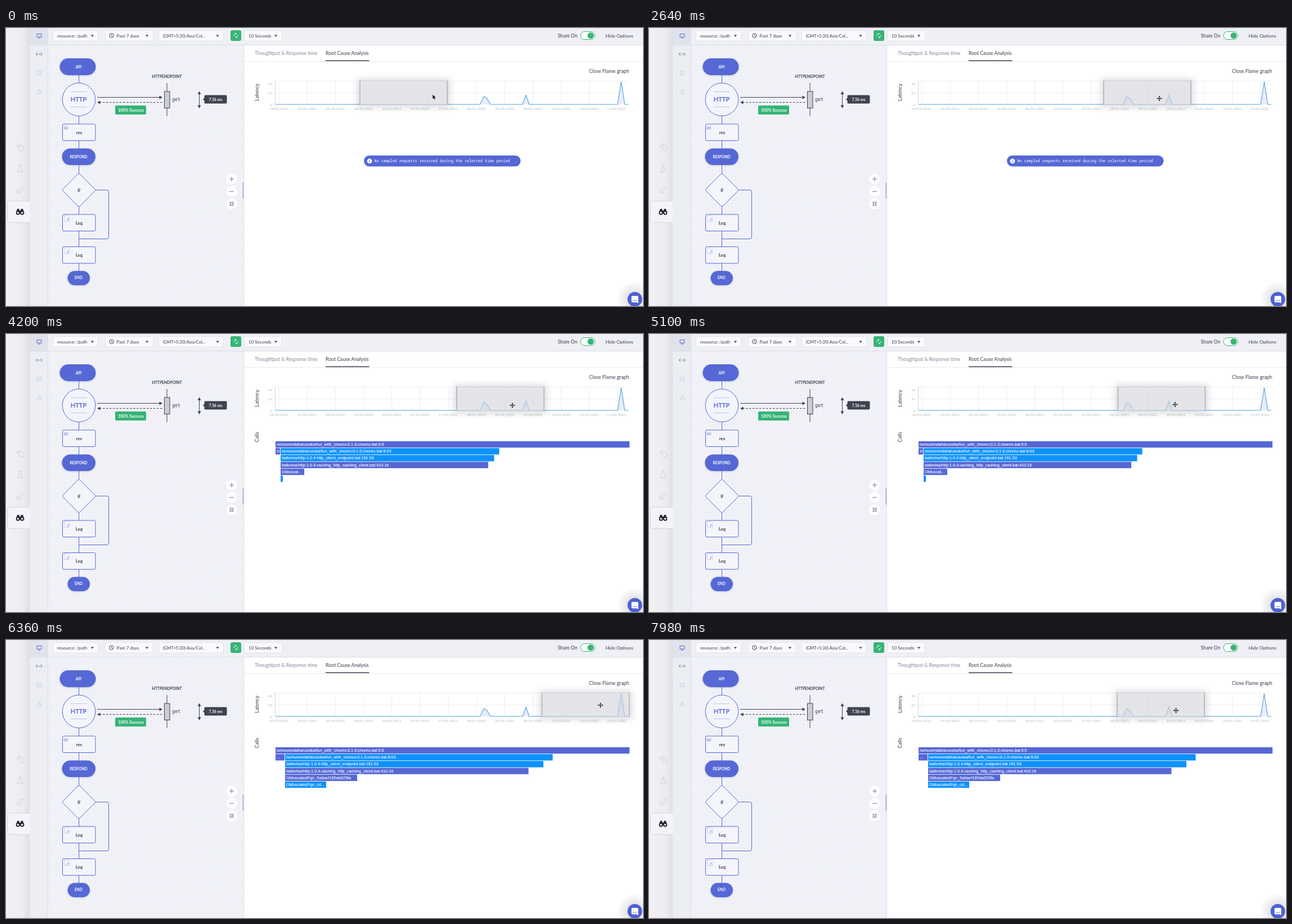
Recreate the animation shown at these times as an HTML page. Size 1132 by 495 pixels, loop 8000 ms.

```html
<!DOCTYPE html>
<html lang="en">
<head>
<meta charset="utf-8">
<title>Root cause analysis</title>
<style>
  html, body { margin: 0; width: 100%; height: 100%; overflow: hidden; background: #fff; }
  svg { display: block; width: 1132px; height: 495px; font-family: Lato, sans-serif; font-size: 8px; fill: none; }
  text { fill: #3b3c4c; white-space: pre; }
  .mid { text-anchor: middle; }
  .bold { font-weight: 700; }
  .white text, text.white { fill: #fff; }
  .mono { font-family: "Noto Sans Mono", "DejaVu Sans Mono", monospace; }
  .blue { fill: #5567d5; }
  .line { stroke: #5567d5; }
  .dark { stroke: #40414d; }
  .node { fill: #f4f5fb; stroke: #5567d5; }
  .box { fill: #fafafd; stroke: #e1e3ec; }
  .faint { stroke: #cdcfd8; }
  .axis text { fill: #b1b4c0; font-size: 6.1px; }
  .flame text { fill: #fff; font: 7.32px "Liberation Sans", Arial, sans-serif; stroke: #fff; stroke-width: .12; }
</style>
</head>
<body>
<svg viewBox="0 0 1132 495">
  <defs>
    <pattern id="dots" x="75" y="31" width="5.8" height="5.8" patternUnits="userSpaceOnUse">
      <circle cx="2.9" cy="2.9" r=".55" fill="#d3d6e1"/>
    </pattern>
    <pattern id="hatch" width="2.6" height="2.6" patternUnits="userSpaceOnUse" patternTransform="rotate(45)">
      <path d="M.6 0V2.6" stroke="#777883" stroke-width=".8"/>
    </pattern>
    <linearGradient id="rail">
      <stop offset="0" stop-color="#f1f1f4"/><stop offset=".7" stop-color="#ededf1"/><stop offset="1" stop-color="#dfe0e6"/>
    </linearGradient>
    <radialGradient id="glow">
      <stop offset=".4" stop-color="#334" stop-opacity=".13"/><stop offset="1" stop-color="#334" stop-opacity="0"/>
    </radialGradient>
    <filter id="blur" x="-20%" y="-60%" width="140%" height="220%"><feGaussianBlur stdDeviation="6"/></filter>
    <filter id="soft" x="-30%" y="-30%" width="160%" height="170%">
      <feDropShadow dx="0" dy="1" stdDeviation="1.5" flood-color="#335" flood-opacity=".22"/>
    </filter>
    <path id="caret" d="M-2.7-1.5H2.7L0 1.8Z" fill="#40414d"/>
    <g id="log">
      <rect class="node" x="100.5" width="58.5" height="29.5" rx="2.5"/>
      <path d="M104 2.5H110.500L112.500 4.500V12H104Z" fill="#fff" stroke="#b4bce8" stroke-width=".8"/>
      <path class="line" d="M108.500 6L111 8.500 108.500 11"/>
      <text class="mid bold" x="130" y="17.500">Log</text>
    </g>
  </defs>

  <!-- side rails and panels -->
  <rect width="42" height="495" fill="url(#rail)"/>
  <rect x="42" width="33" height="495" fill="#eceef4"/>
  <rect x="42" width="33" height="30" fill="#e0e3ec"/>
  <rect x="75" width="1057" height="30" fill="#eff0f5"/>
  <rect x="75" y="30" width="348" height="465" fill="#f1f2f8"/>
  <rect x="75" y="31" width="347" height="464" fill="url(#dots)"/>
  <path d="M41.500 0V495M74.500 30V495M42 30.500H1132M422.500 30V495" stroke="#dcdee7"/>
  <path d="M423 59.500H1132" stroke="#e9eaef"/>
  <path d="M42 308H8Q2.500 308 2.500 313.500V341Q2.500 346.500 8 346.500H42" fill="#f3f4f9" stroke="#d3d5de"/>
  <g class="faint">
    <path d="M19 211L24 206.500 29 211A4 4 0 1 1 24 215ZM20 211H27"/>
    <path d="M22.500 244H27.500M23.500 244V249L20 256H30L26.500 249V244"/>
    <path d="M21 291Q23 284 30 283.500 30 290 23 293ZM20 288L18 291M25 292L23 296M19 295L21 292"/>
    <path d="M55.500 76.500H62.500V81H55.500ZM54.500 83.500H63.500M59 109L63.500 117H54.500ZM59 112V114.500"/>
  </g>
  <g fill="#24252f">
    <path d="M20 322H23.500V325H26.500V322H30L32 329H18Z"/>
    <circle cx="21.300" cy="329" r="3.700"/><circle cx="28.700" cy="329" r="3.700"/>
    <circle cx="21.300" cy="329" r="1.800" fill="#f3f4f9"/><circle cx="28.700" cy="329" r="1.800" fill="#f3f4f9"/>
  </g>
  <path class="line" d="M55 10.500H63V16H55ZM57 18H61"/>
  <path class="dark" d="M56 44L53.500 46.500 56 49M61.500 44L64 46.500 61.500 49M58 46.500H59.800"/>

  <!-- header -->
  <g class="box">
    <rect x="83.500" y="4.500" width="80" height="18.500" rx="3"/>
    <rect x="176.500" y="4.500" width="85" height="18.500" rx="3"/>
    <rect x="271.500" y="4.500" width="115" height="18.500" rx="3"/>
    <rect x="423.500" y="4.500" width="67" height="18.500" rx="3"/>
  </g>
  <text x="91" y="16.500">resource: /path</text>
  <text x="196.500" y="16.500" font-size="8.100">Past 7 days</text>
  <text x="279" y="16.500" font-size="7.500">(GMT+5:30) Asia/Col...</text>
  <text x="431" y="16.500">10 Seconds</text>
  <use href="#caret" x="153.500" y="14"/><use href="#caret" x="250.500" y="14"/>
  <use href="#caret" x="376" y="14"/><use href="#caret" x="479.500" y="14"/>
  <circle class="dark" cx="187.500" cy="13.500" r="3.800"/><path class="dark" d="M187.500 11V14L189.500 15" stroke-width=".8"/>
  <rect x="399" y="4" width="19" height="19" rx="3" fill="#36b475"/>
  <path d="M405 14.500V12.500L408.500 10M406.500 9.500L409 10 408.500 12M412 12.500V14.500L408.500 17M411 17.500L408.500 17 409 15" stroke="#fff" stroke-width=".9"/>
  <text x="980.500" y="16.800" font-size="8.600">Share On</text>
  <rect x="1021" y="6.500" width="25.500" height="14" rx="7" fill="#fff" stroke="#36b475"/>
  <circle cx="1039" cy="13.500" r="5.500" fill="#36b475"/>
  <text x="1065.500" y="16.800" font-size="8.400">Hide Options</text>

  <!-- flow diagram -->
  <path class="line" d="M129.500 84V98M129.500 156V171M129.500 200V215M129.500 244V259M129.500 318V332M129.500 361V390M129.500 419V433M159 288.500H179Q182.500 288.500 182.500 292V372Q182.500 375.500 179 375.500H129.500"/>
  <g class="blue" filter="url(#soft)">
    <rect x="95.500" y="54" width="64" height="30" rx="15"/>
    <rect x="99.500" y="214.500" width="59.500" height="29.500" rx="14.700"/>
    <rect x="109.500" y="432.500" width="39.500" height="25.500" rx="12.700"/>
  </g>
  <g class="mid bold white" font-size="6.600">
    <text x="129" y="71.600">API</text><text x="129" y="231.800">RESPOND</text><text x="129" y="447.400">END</text>
  </g>
  <circle class="node" cx="129.500" cy="127.300" r="29.300"/>
  <path d="M115 113.500H143.500M115 140.500H143.500" stroke="#bac2ec"/>
  <text class="mid bold blue" x="129" y="131" font-size="11" style="fill:#5567d5">HTTP</text>
  <rect class="node" x="100.500" y="171" width="58.500" height="29.500" rx="2.500"/>
  <text x="102.500" y="179.500" font-style="italic" style="fill:#5567d5">(x)</text>
  <text class="mid bold" x="130" y="189">res</text>
  <path class="node" d="M127.500 260.200Q129.500 258.200 131.500 260.200L157.500 286.500Q159.500 288.500 157.500 290.500L131.500 316.800Q129.500 318.800 127.500 316.800L101.500 290.500Q99.500 288.500 101.500 286.500Z"/>
  <text class="mid bold" x="130" y="292" font-size="6.500">IF</text>
  <use href="#log" y="332"/><use href="#log" y="389.500"/>

  <text class="mid bold" x="286" y="89" font-size="6.800">HTTPENDPOINT</text>
  <path class="dark" d="M286 98V157M162 123.500H274M343.500 116V140"/>
  <path class="dark" d="M166 132.500H280" stroke-dasharray="3.500 2.500"/>
  <path d="M278 123.500L272.500 120.500V126.500ZM162 132.500L167.500 129.500V135.500ZM343.500 112.500L340.500 118H346.500ZM343.500 143L340.500 137.500H346.500Z" fill="#40414d"/>
  <rect x="281.500" y="113" width="9.500" height="29.500" fill="#f1f2f8"/>
  <rect class="dark" x="281.500" y="113" width="9.500" height="29.500" style="fill:url(#hatch)"/>
  <text class="mono" x="295" y="130" font-size="8.300">get</text>
  <rect x="194" y="138" width="55" height="16" rx="2" fill="#36b475"/>
  <text class="mid bold white" x="222" y="148.700" font-size="7.300">100% Success</text>
  <path d="M354 119.500H390.500Q392.500 119.500 392.500 121.500V132.500Q392.500 134.500 390.500 134.500H354Q352.500 134.500 352.500 132.500V129.500L350 127 352.500 124.500V121.500Q352.500 119.500 354 119.500Z" fill="#40424f"/>
  <text class="mid bold white" x="372.500" y="129.500" font-size="6.800">7.56 ms</text>

  <g fill="#fff"><circle cx="401" cy="269" r="9.700"/><circle cx="401" cy="291" r="9.700"/><circle cx="401" cy="313" r="9.700"/></g>
  <path d="M397 269H405M401 265V273M397 291H405" stroke="#777983"/>
  <path d="M397 309L400 312M400 309.500V312H397.500M405 309L402 312M402 309.500V312H404.500M397 317L400 314M400 316.500V314H397.500M405 317L402 314M402 316.500V314H404.500" stroke="#777983"/>
  <rect x="420" y="275" width="3" height="29" rx="1" fill="#c3c6d0"/>

  <!-- analysis panel -->
  <text x="442" y="48" font-size="8.700" style="fill:#85879a">Thoughtput &amp; Response time</text>
  <text x="568" y="48" font-size="8.700">Root Cause Analysis</text>
  <path d="M568 58.300H645.500" stroke="#40414d" stroke-width="1.500"/>
  <text x="1036" y="80" font-size="8.850">Close Flame graph</text>
  <text class="mid" transform="translate(449 114.500) rotate(-90)" font-size="9">Latency</text>
  <g id="axis" class="axis">
    <path d="M478 94.500H1106M478 115.500H1106" stroke="#eeeff3"/>
    <path d="M478.500 94V136" stroke="#d3d5de"/>
    <g text-anchor="end"><text x="473" y="101.500">40</text><text x="473" y="117.500">20</text><text x="473" y="138.500">0</text></g>
  </g>
  <path d="M478.500 136H842.500L849 122 855 126 861 136H918L924 119.500 930 136H1087L1093.300 95.500 1099.500 136H1106" stroke="#49a3e2" stroke-width="1.100" fill="#5567d5" fill-opacity=".12"/>
  <g id="brush">
    <rect x="-5" y="90" width="165" height="52" fill="#445" opacity=".17" filter="url(#blur)"/>
    <rect y="94" width="155" height="42.500" fill="#e9eaef" fill-opacity=".55"/>
    <path d="M0 94H155M0 136.500H155" stroke="#c6c8d2" stroke-width=".8"/>
    <path d="M0 93.500V137M155 93.500V137" stroke="#b9bbc5" stroke-width="2"/>
  </g>

  <g id="empty">
    <rect class="blue" x="636" y="227" width="278.500" height="19.500" rx="9.700"/>
    <circle cx="646" cy="237" r="4.400" fill="#fff"/>
    <path class="line" d="M646 236V239.500M646 234V235.200" stroke-width="1.200"/>
    <text class="mono white" x="654.500" y="239.300" font-size="6.700">No sampled requests received during the selected time period</text>
  </g>
  <g id="loading">
    <circle cx="751" cy="229" r="7.800" stroke="#e7e8ef" stroke-width="2.400"/>
    <path id="spinner" class="line" d="M0 7.800A7.800 7.800 0 0 1-7.400-2.400" stroke-width="2.400"/>
    <text id="loadingText" x="766" y="231.500" font-size="8.400" style="fill:#9496a5"></text>
  </g>
  <text id="calls" class="mid" transform="translate(449 183.500) rotate(-90)" font-size="9">Calls</text>
  <g id="flameA" class="flame"></g>
  <g id="flameB" class="flame"></g>

  <circle cx="1117" cy="483" r="32" fill="url(#glow)"/>
  <circle cx="1117.500" cy="483" r="13" fill="#4f61d2"/>
  <path d="M1113.500 477H1121.500Q1123.500 477 1123.500 479V490L1120.500 488.500H1113.500Q1111.500 488.500 1111.500 486.500V479Q1111.500 477 1113.500 477Z" fill="#fff"/>
  <path d="M1114 484.500Q1117.500 487 1121 484.500" stroke="#4f61d2" stroke-width=".9"/>

  <path id="arrow" d="M0 0V9L2.200 7.200 3.700 10.200 5.200 9.500 3.800 6.600 6.500 6.300Z" fill="#111" stroke="#fff" stroke-width=".6"/>
  <path id="move" d="M0-5L2.200-2.500H.8V-.8H2.500V-2.200L5 0 2.500 2.200V.8H.8V2.500H2.200L0 5-2.200 2.500H-.8V.8H-2.500V2.200L-5 0-2.500-2.200V-.8H-.8V-2.500H-2.200Z" fill="#111" stroke="#fff" stroke-width=".5"/>
</svg>
<script>
const $ = id => document.getElementById(id);
const svgNode = (parent, tag, attrs, text = '') => {
  const node = document.createElementNS(parent.namespaceURI, tag);
  for (const key in attrs) node.setAttribute(key, attrs[key]);
  node.textContent = text;
  parent.append(node);
};

[4, 5, 5, 6, 6, 7, 7, 8, 9, 9, 10, 10, 11].forEach((day, i) => {
  const x = 485 + i * 50.17;
  svgNode($('axis'), 'path', { d: `M${x} 94V136`, stroke: '#ebecf1' });
  svgNode($('axis'), 'text', { x: Math.min(x, 1085), y: 146.4, class: 'mid' },
    `${String(day).padStart(2, '0')}/01/2021`);
});

const PURPLE = '#5567d5', AZURE = '#0d91fb';
const root = 'nomuvendaharusoka/fun_with_choreo:0.1.0:choreo.bal:';
const http = 'ballerina/http:1.0.4:';

// Bars: [row, left, right, colour, label]
function buildFlame(id, left, stub, ends, labels) {
  const bars = [
    [0, 479, 1108, PURPLE, root + '5:5'],
    [1, 479, left - 1, PURPLE, stub],
    [1, left, ends[0], AZURE, root + '8:63'],
    [2, left, ends[1], AZURE, http + 'http_client_endpoint.bal:191:53'],
    [3, left, ends[2], PURPLE, http + 'caching_http_caching_client.bal:410:16'],
    [4, left, ends[3], PURPLE, labels[0]],
    [5, left, ends[4], AZURE, labels[1]],
  ];
  for (const [row, x, right, fill, label] of bars) {
    const y = 191 + row * 12.2;
    svgNode($(id), 'rect', { x, y, width: right - x, height: 11.3, fill });
    svgNode($(id), 'text', { x: x + 2, y: y + 7.9 }, label);
  }
}
buildFlame('flameA', 488, 'π', [876.5, 867.5, 857, 530, 492], ['Obfuscat...', '']);
buildFlame('flameB', 496, '...', [971.5, 955, 928.5, 624, 569],
  ['ObfuscatedFqn_5a0aef195da525fa', 'ObfuscatedFqn_cd...']);

const linear = p => p, easeOut = p => p * (2 - p), smooth = p => p * p * (3 - 2 * p);

// Keys: [time, brush left, pointer x, pointer y, easing towards this key]
const keys = [
  [0, 629, 758, 118],
  [240, 629, 754, 114, smooth],
  [400, 629, 754, 114, linear],
  [900, 629, 728, 112, smooth],
  [1650, 629, 728, 112, linear],
  [1800, 663, 771, 120, linear],
  [2580, 808, 907, 125.5, easeOut],
  [2700, 808, 907, 125.5, linear],
  [3000, 801, 900, 127, smooth],
  [4830, 801, 900, 127, linear],
  [5100, 833, 934.5, 125.5, p => p * p],
  [5730, 952.5, 1056.5, 116, easeOut],
  [7170, 952.5, 1056.5, 116, linear],
  [7980, 832, 936.5, 125.5, smooth],
  [8000, 832, 936.5, 125.5, linear],
];

function poseAt(t) {
  const i = keys.findIndex((key, n) => n && t <= key[0]);
  const a = keys[i - 1], b = keys[i];
  const p = b[4]((t - a[0]) / (b[0] - a[0]));
  return [1, 2, 3].map(k => a[k] + (b[k] - a[k]) * p);
}

const show = (id, visible) => $(id).setAttribute('display', visible ? 'inline' : 'none');
const place = (id, x, y) => $(id).setAttribute('transform', `translate(${x} ${y})`);

function draw(t) {
  const [left, x, y] = poseAt(t);
  place('brush', left, 0);
  place('arrow', x, y);
  place('move', x, y);
  show('arrow', t < 480);
  show('move', t >= 480);

  const flameA = t >= 4020 && t < 5790, flameB = t >= 6240;
  const empty = t < 3120;
  show('empty', empty);
  show('flameA', flameA);
  show('flameB', flameB);
  show('calls', flameA || flameB);
  show('loading', !empty && !flameA && !flameB);
  $('spinner').setAttribute('transform', `translate(751 229) rotate(${(t - 3660) * .36 - 10})`);
  $('loadingText').textContent = 'Loading' + '.'.repeat(1 + Math.floor(t / 300) % 3);
}

const start = performance.now();
function tick() {
  draw((performance.now() - start) % 8000);
  requestAnimationFrame(tick);
}
tick();
</script>
</body>
</html>
```
